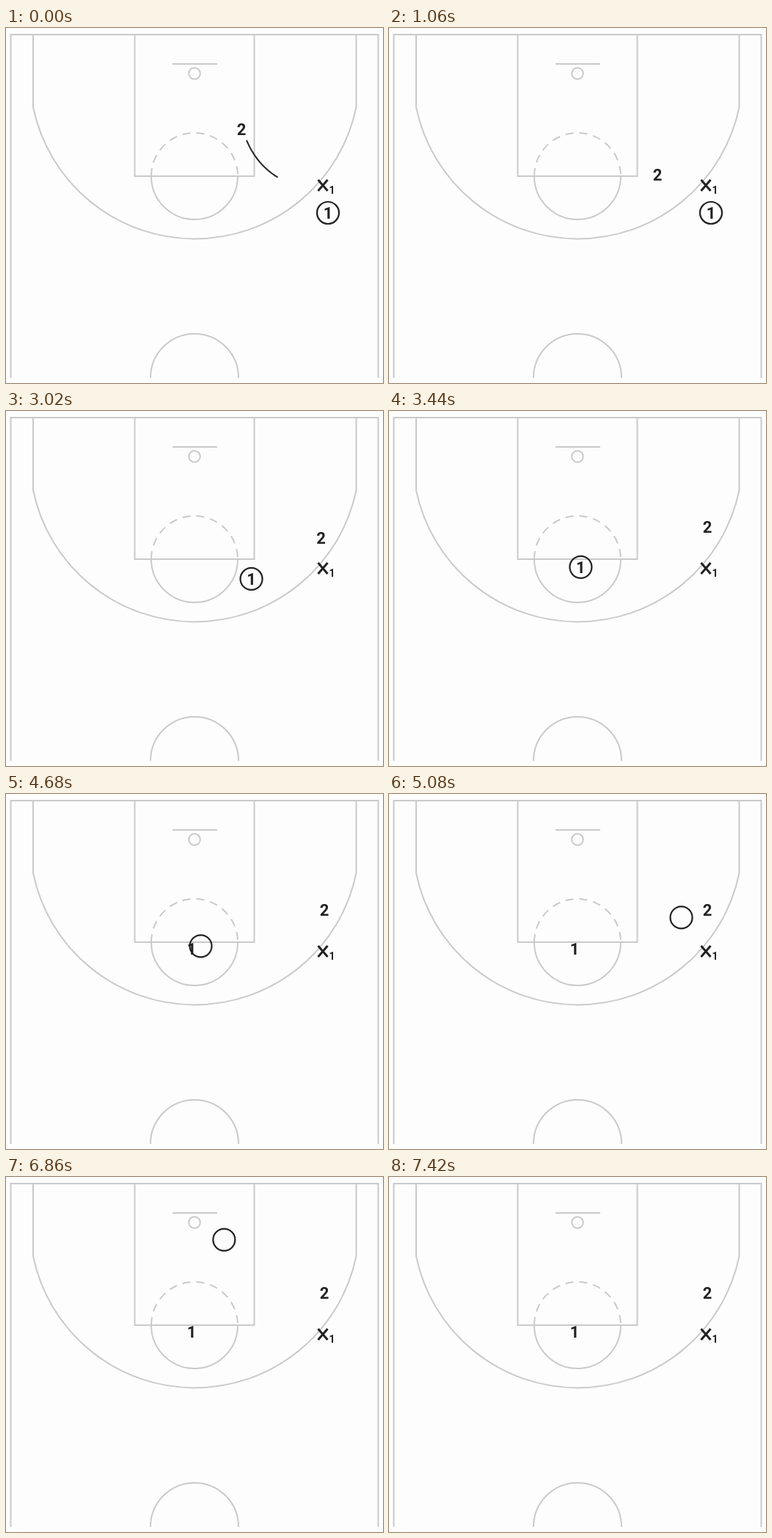
Write an HTML page that moves like this. It is 514 px wide and 484 px high and loops after 7.44 s.

```html
<!DOCTYPE html>
<html lang="en">
<head>
<meta charset="utf-8">
<title>Ball screen play</title>
<style>
  html, body { margin: 0; width: 100%; height: 100%; overflow: hidden; background: #fdfdfd; }
  svg { display: block; width: 514px; height: 484px; }
  .court { fill: none; stroke: #cacaca; stroke-width: 2; }
  .play, .ring, .aim { fill: none; stroke: #222; stroke-width: 2; }
  .ring { stroke-width: 2.2; }
  .head { fill: #222; stroke: #222; stroke-width: 2; }
  .cross { fill: none; stroke: #222; stroke-width: 3; }
  text { font: 700 22px Roboto, sans-serif; fill: #222; text-anchor: middle; }
  .sub { font-size: 14px; }
</style>
</head>
<body>
<svg viewBox="0 0 514 484">
  <g class="court">
    <path d="M6.5 477V9H507.5V477"/>
    <path d="M175.5 9V202H338.5V9"/>
    <path d="M37 9V108A224.9 224.9 0 0 0 477.5 108V9"/>
    <path d="M227 49H288"/>
    <circle cx="257" cy="62" r="7.8"/>
    <path d="M198 202A59 59 0 0 0 316 202"/>
    <path d="M198 202A59 59 0 0 1 316 202" stroke-dasharray="11 8"/>
    <path d="M197 477A60 60 0 0 1 317 477"/>
  </g>
  <g id="aim" class="aim" transform="translate(257 62) rotate(28.6)">
    <circle r="10"/>
    <path d="M-14 0H-7M7 0H14M0 -14V-7M0 7V14"/>
  </g>
  <g id="lines"></g>
  <path class="cross" d="M425.5 207L438.5 222M438.5 207L425.5 222"/>
  <text class="sub" x="444.5" y="226">1</text>
  <text id="one" y="8">1</text>
  <text id="two" y="8">2</text>
  <circle id="ring" class="ring" r="15"/>
</svg>
<script>
const LOOP = 7440, DRAW = 240;
const $ = id => document.getElementById(id);
const clamp = x => Math.max(0, Math.min(1, x));
const easeOut = x => 1 - (1 - clamp(x)) ** 2;
const mix = (a, b, u) => [a[0] + (b[0] - a[0]) * u, a[1] + (b[1] - a[1]) * u];
const straight = (a, b) => u => mix(a, b, u);
const curve = (a, c, b) => u => mix(mix(a, c, u), mix(c, b, u), u);

function wave(a, b) {
  const dx = b[0] - a[0], dy = b[1] - a[1], len = Math.hypot(dx, dy);
  return u => {
    const s = u * len, amp = 5 * Math.min(1, (len - s) / 12);
    const off = amp * Math.cos(2 * Math.PI * (s - 5.3) / 19);
    const [x, y] = mix(a, b, u);
    return [x + off * dy / len, y - off * dx / len];
  };
}

const ARROW = 'M0 -4L8 0L0 4Z', BAR = 'M0 -10V10';
const lines = [
  { at: -100, out: 640, path: curve([328, 153], [349, 203], [403, 217]), head: BAR, angle: 14 },
  { at: 1540, out: 2540, path: wave([424.3, 248.8], [265.5, 214]), head: ARROW, angle: 192.4 },
  { at: 1800, out: 2540, path: straight([420.3, 203.6], [427.8, 178.8]), head: ARROW, angle: -73.3 },
  { at: 3650, out: 4660, cut: 20, path: straight([267.4, 206.8], [413, 164.2]), head: ARROW, angle: -16.3, dash: '12 4' },
  { at: 5430, out: 6140, path: curve([420.5, 151.5], [337, 110], [257, 62]), dash: '12 4' }
];

function add(cls) {
  const el = document.createElementNS('http://www.w3.org/2000/svg', 'path');
  el.setAttribute('class', cls);
  $('lines').append(el);
  return el;
}

for (const l of lines) {
  l.el = add('play');
  if (l.dash) l.el.setAttribute('stroke-dasharray', l.dash);
  if (l.head) {
    const [x, y] = l.path(1);
    l.tip = add('head');
    l.tip.setAttribute('d', l.head);
    l.tip.setAttribute('transform', `translate(${x} ${y}) rotate(${l.angle})`);
  }
}

function drawLine(l, t) {
  const p = easeOut((t - l.at) / DRAW);
  const alpha = 1 - clamp((t - l.out) / (l.cut || 100));
  const shown = p > 0 && alpha > 0;
  l.el.style.opacity = shown ? alpha : 0;
  if (l.tip) l.tip.style.opacity = shown ? alpha * clamp((t - l.at - DRAW) / 60) : 0;
  if (!shown) return;
  const n = 160;
  let d = '';
  for (let i = 0; i <= n; i++) {
    d += (i ? 'L' : 'M') + l.path(p * i / n).map(v => v.toFixed(2)).join(' ');
  }
  l.el.setAttribute('d', d);
}

// Each move holds its start pose until `from`, then joins the eased course.
const move = (from, start, dur, path) => ({ from, start, dur, path });
const spot = { one: [439, 252], oneEnd: [253, 211], two: [321, 138], screen: [416, 218], twoEnd: [434, 158], rim: [257, 62] };
const drive = move(2900, 2705, 935, straight(spot.one, spot.oneEnd));
const moves = {
  one: [drive],
  two: [
    move(800, 780, 760, curve(spot.two, [343, 207], spot.screen)),
    move(2900, 2705, 630, straight(spot.screen, spot.twoEnd))
  ],
  ring: [
    drive,
    move(4680, 4654, 766, straight(spot.oneEnd, spot.twoEnd)),
    move(6540, 6473, 747, curve(spot.twoEnd, [344, 114], spot.rim))
  ]
};

function place(id, t) {
  let m = moves[id][0];
  for (const next of moves[id]) if (t >= next.from) m = next;
  const [x, y] = m.path(t < m.from ? 0 : easeOut((t - m.start) / m.dur));
  $(id).setAttribute('transform', `translate(${x} ${y})`);
}

function frame() {
  const t = performance.now() % LOOP;
  lines.forEach(l => drawLine(l, t));
  Object.keys(moves).forEach(id => place(id, t));
  $('ring').style.opacity = 1 - clamp((t - 7320) / 100);
  $('aim').style.opacity = 0.6 * clamp((t - 5660) / 40) * (1 - clamp((t - 6140) / 100));
  requestAnimationFrame(frame);
}
frame();
</script>
</body>
</html>
```
